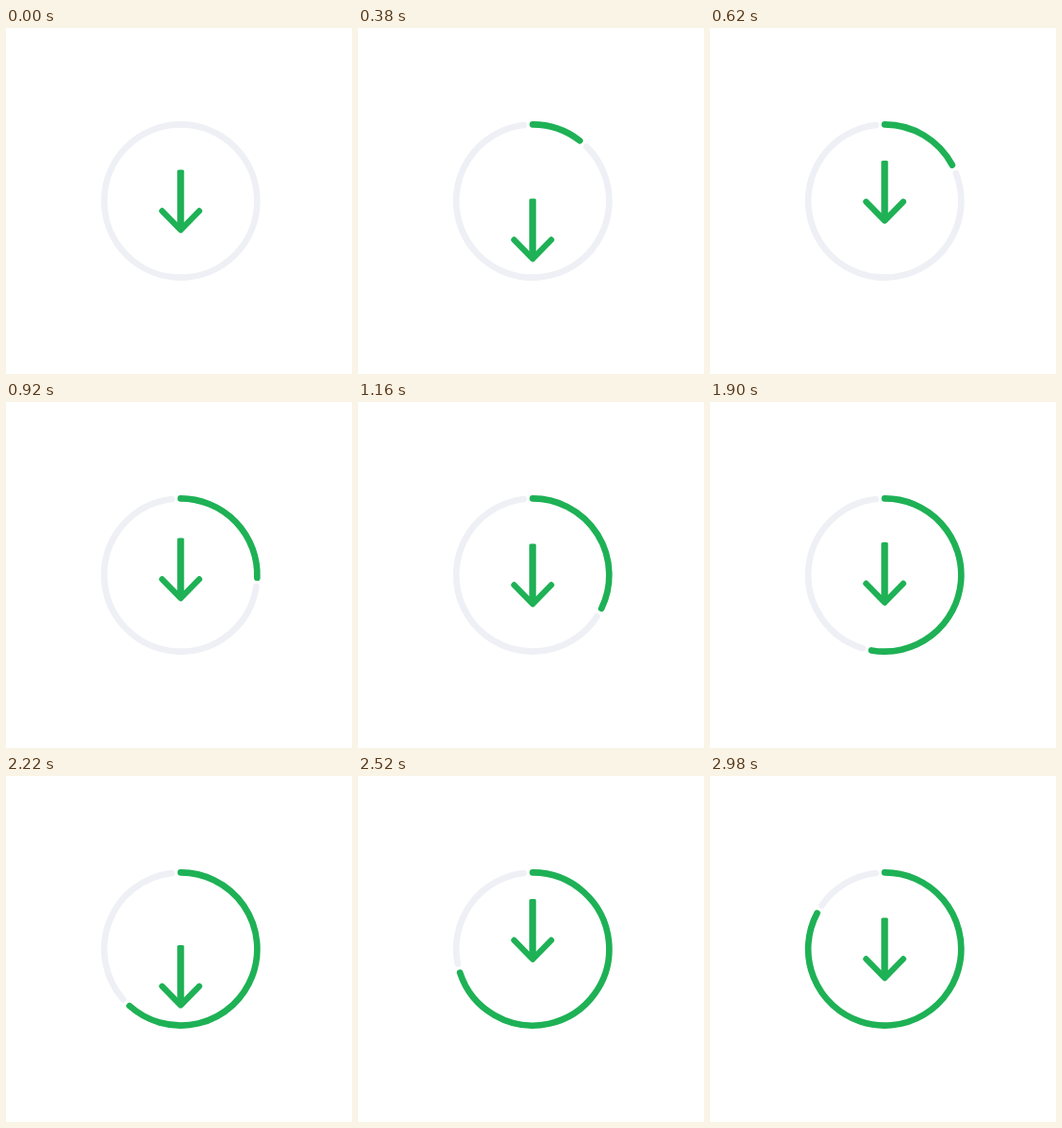
An HTML page that plays this animation: 360x360 px, repeating every 3 s.

```html
<!DOCTYPE html>
<html>
<head>
<meta charset="utf-8">
<style>
  html, body { margin: 0; width: 100%; height: 100%; overflow: hidden; background: #fff; }
  svg { display: block; width: 100vw; height: 100vh; }
  path { fill: none; stroke-width: 6.6; stroke-linecap: round; stroke-linejoin: round; }
</style>
</head>
<body>
<svg viewBox="0 0 360 360">
  <path id="track" stroke="#eef0f5"/>
  <path id="bar" stroke="#1eb155"/>
  <g id="arrow">
    <rect x="178.2" y="147.6" width="7.1" height="62" rx="1.5" fill="#1eb155"/>
    <path d="M162.4 190.4L181.75 210.2L201.1 190.4" stroke="#1eb155" style="stroke-width:6.2"/>
  </g>
</svg>
<script>
const LOOP = 3000, STEP = 20, BOUNCE = 1800;
const CX = 181.75, CY = 180, R = 79.6, GAP = 6.7;
// time within one bounce, vertical offset
const KEYS = [[0, 0], [100, -1.5], [380, 30], [720, -19.5], [1040, 0], [BOUNCE, 0]];
const [track, bar, arrow] = ['track', 'bar', 'arrow'].map(id => document.getElementById(id));

function point(deg) {
  const a = deg * Math.PI / 180;
  return `${CX + R * Math.sin(a)} ${CY - R * Math.cos(a)}`;
}

function arc(from, to) {
  return `M${point(from)}A${R} ${R} 0 ${to - from > 180 ? 1 : 0} 1 ${point(to)}`;
}

function offset(t) {
  const i = KEYS.findIndex(k => k[0] > t);
  const [t0, y0] = KEYS[i - 1], [t1, y1] = KEYS[i];
  const ease = (1 - Math.cos(Math.PI * (t - t0) / (t1 - t0))) / 2;
  return y0 + (y1 - y0) * ease;
}

function draw(now) {
  const t = Math.floor(now % LOOP / STEP) * STEP;
  const angle = t * 0.1;
  track.setAttribute('d', t ? arc(angle + GAP, 360 - GAP) : arc(0, 180) + arc(180, 360));
  bar.setAttribute('d', t ? arc(0, angle) : '');
  arrow.setAttribute('transform', `translate(0 ${offset(t % BOUNCE)})`);
}

const start = performance.now();
function tick() {
  draw(performance.now() - start);
  requestAnimationFrame(tick);
}
tick();
</script>
</body>
</html>
```
